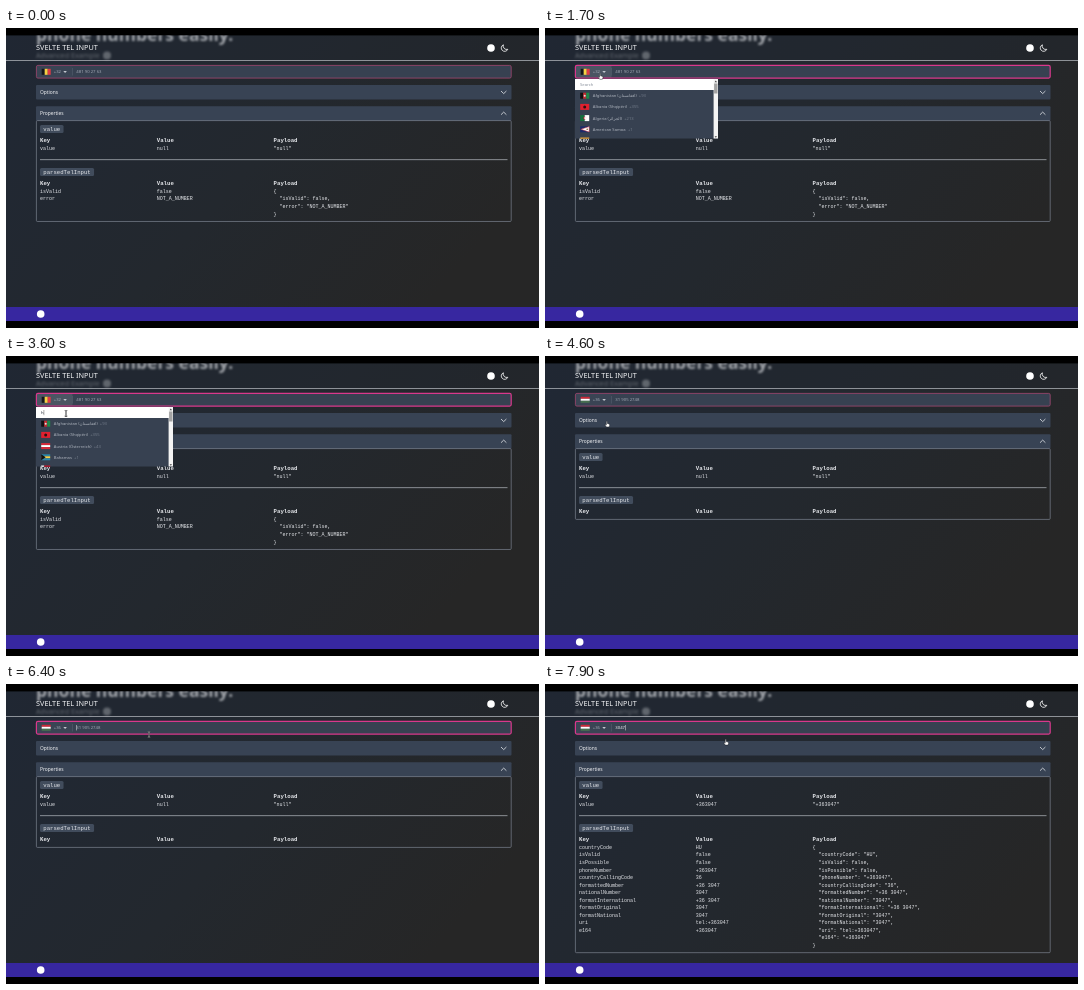
An HTML page that plays this animation: 533x300 px, repeating every 8000 ms.

```html
<!DOCTYPE html>
<html lang="en">
<head>
<meta charset="utf-8">
<style>
html, body { margin: 0; width: 100%; height: 100%; overflow: hidden; background: #000; }
svg { display: block; width: 100vw; height: 100vh; font-family: "Noto Sans", "DejaVu Sans", sans-serif; }
.mono { font-family: "Liberation Mono", monospace; }
</style>
</head>
<body>
<svg viewBox="0 0 533 300">
  <defs>
    <linearGradient id="bg" x1="0" y1="0" x2="1" y2=".5">
      <stop offset="0" stop-color="#202835"/>
      <stop offset=".55" stop-color="#23282e"/>
      <stop offset="1" stop-color="#262626"/>
    </linearGradient>
    <clipPath id="page"><rect y="7.5" width="533" height="285.5"/></clipPath>
    <clipPath id="menu"><rect x="30" y="50" width="145" height="60.7"/></clipPath>
    <filter id="blur" x="-10%" y="-50%" width="120%" height="200%"><feGaussianBlur stdDeviation="1.3"/></filter>
  </defs>
  <g clip-path="url(#page)">
    <rect width="533" height="300" fill="url(#bg)"/>
    <g filter="url(#blur)" fill="#e5e7eb">
      <text x="30" y="12.5" font-size="17.5" font-weight="700">phone numbers easily.</text>
      <g opacity=".5">
        <text x="30" y="30" font-size="7.2">Advanced Example</text>
        <circle cx="101" cy="27.5" r="4"/>
      </g>
    </g>
    <rect y="7" width="533" height="25" fill="#20262f" opacity=".35"/>
    <rect y="32" width="533" height=".8" fill="#a9adb3"/>
    <text x="30" y="22.3" font-size="7.3" fill="#f3f4f6">SVELTE TEL INPUT</text>
    <circle cx="485" cy="20" r="3.8" fill="#fff"/>
    <path d="M497.4 16.8a3.4 3.4 0 1 0 4.4 4.5a3.5 3.5 0 0 1-4.4-4.5z" fill="none" stroke="#fff" stroke-width=".8"/>
    <rect y="279" width="533" height="14" fill="#3727a0"/>
    <circle cx="34.7" cy="286" r="3.8" fill="#fff"/>
    <g id="view"></g>
  </g>
</svg>
<script>
const LOOP = 8000, OPEN = 1500, PICK = 4500, FOCUS = 6300;
const view = document.getElementById("view");

const box = (x, y, w, h, fill, more = "") =>
  `<rect x="${x}" y="${y}" width="${w}" height="${h}" fill="${fill}" ${more}/>`;
const path = (d, stroke, w, fill = "none") =>
  `<path d="${d}" fill="${fill}" stroke="${stroke}" stroke-width="${w}"/>`;
// y is the vertical middle of the line
const text = (x, y, s, size, fill, more = "") =>
  `<text x="${x}" y="${y + size * .35}" font-size="${size}" fill="${fill}" ${more}>${s}</text>`;
const mono = (x, y, s, size = 5, weight = 400) =>
  text(x, y, s, size, "#e5e7eb", `class="mono" font-weight="${weight}"`);

// "v" stripes stand side by side, "h" stripes are stacked
function flag(x, y, [dir, colors, mark = ""]) {
  const list = colors.split(" "), n = list.length;
  const stripes = list.map((c, i) => dir == "v"
    ? box(9 * i / n, 0, 9 / n, 6, c) : box(0, 6 * i / n, 9, 6 / n, c)).join("");
  return `<g transform="translate(${x} ${y - 3})">${stripes}${mark}</g>`;
}

const dot = (x, r, c) => `<circle cx="${x}" cy="3" r="${r}" fill="${c}"/>`;
const rtl = s => `(&#x2068;${s}&#x2069;)`;
const BE = ["v", "#16161a #f5d142 #e03a45"];
const HU = ["h", "#ce2939 #fff #477050"];
const afghanistan = ["Afghanistan " + rtl("افغانستان"), "+93", ["v", "#111 #bf2a2f #1c8a48", dot(4.5, 1, "#ddd")]];
const albania = ["Albania (Shqipëri)", "+355", ["h", "#e0202f", dot(4.5, 1.5, "#2a1012")]];
const hungary = ["Hungary (Magyarország)", "+36", HU];
const lists = {
  "": [afghanistan, albania,
    ["Algeria " + rtl("الجزائر"), "+213", ["v", "#16703c #fff", dot(4.6, 1.4, "#d21034") + dot(5.1, 1.1, "#fff")]],
    ["American Samoa", "+1", ["h", "#1b2a6b", path("M9 .3L.6 3L9 5.7z", "#c22a3c", .5, "#fff") + dot(7, .8, "#8a5a2c")]],
    ["Andorra", "+376", ["h", "#e8a33a"]]],
  h: [afghanistan, albania,
    ["Austria (Österreich)", "+43", ["h", "#d92b3a #fff #d92b3a"]],
    ["Bahamas", "+1", ["h", "#2c86a8 #f5d24b #2c86a8", path("M0 0L4.5 3L0 6z", "none", 0, "#111")]],
    ["Bahrain", "+973", ["v", "#fff #ce1126 #ce1126"]]],
  hu: [["Bhutan", "+975", ["v", "#f3c531 #e8682a"]], hungary,
    ["Lithuania (Lietuva)", "+370", ["h", "#f5c32c #1c7a4c #b92a35"]]],
  hun: [hungary]
};

const latest = (steps, t) => steps.reduce((v, [at, s]) => t >= at ? s : v, "");
const searched = t => latest([[3400, "h"], [3700, "hu"], [3900, "hun"]], t);
const typed = t => latest([[7200, "3"], [7400, "30"], [7700, "304"], [7900, "3047"]], t);

function parsed(t, num) {
  if (t < PICK) return { isValid: false, error: "NOT_A_NUMBER" };
  if (!num) return null;
  if (num.length < 2) return { isValid: false, error: "TOO_SHORT" };
  const full = "+36" + num, spaced = "+36 " + num;
  return {
    countryCode: "HU", isValid: false, isPossible: false, phoneNumber: full,
    countryCallingCode: "36", formattedNumber: spaced, nationalNumber: num,
    formatInternational: spaced, formatOriginal: num, formatNational: num,
    uri: "tel:" + full, e164: full
  };
}

function field(t, num) {
  const open = t >= OPEN && t < PICK, lit = open || t >= FOCUS, hu = t >= PICK;
  const hint = hu ? "31 905 2748" : "481 90 27 63";
  return box(30.4, 37.4, 474.8, 12.7, "#374151", 'rx="1.5"') +
    box(31, 38, 35.5, 11.5, open ? "#4b5563" : "#3a4454") +
    box(66.4, 40, .5, 7.5, "#596373") +
    box(30.4, 37.4, 474.8, 12.7, "none",
      `rx="1.5" stroke="${lit ? "#d9388c" : "#a34872"}" stroke-width="${lit ? 1.2 : .8}"`) +
    flag(35.7, 43.8, hu ? HU : BE) +
    text(47.8, 43.7, hu ? "+36" : "+32", 4.2, "#a5acb8") +
    path("M57.3 42.9h3.6l-1.8 2z", "none", 0, "#c3c8d0") +
    text(70.3, 43.7, num || hint, 4.25, num ? "#f3f4f6" : "#a0a7b3") +
    (t >= FOCUS ? box(70.4 + num.length * 2.43, 41, .5, 5.4, "#e5e7eb") : "");
}

function bar(y, label, up) {
  const s = up ? -1 : 1;
  return box(30, y - 7.2, 475.5, 14.4, "#384354", 'rx="1"') +
    text(34, y, label, 4.85, "#f3f4f6") +
    path(`M495 ${y - 1.2 * s}l2.7 ${2.6 * s}l2.7 ${-2.6 * s}`, "#e5e7eb", .8);
}

function table(y, name, rows, payload) {
  const heads = ["Key", "Value", "Payload"].map((s, i) => mono(34 + 116.8 * i, y + 11.2, s, 5.7, 700));
  return box(34, y - 3.9, name.length * 3.39 + 6.6, 7.9, "#414c5c", 'rx="1.5"') +
    mono(37.3, y, name, 5.65) + heads.join("") +
    rows.map(([k, v], i) => mono(34, y + 19.2 + 7.52 * i, k) + mono(150.8, y + 19.2 + 7.52 * i, v)).join("") +
    payload.map((s, i) => mono(267.6 + (s[0] == " " ? 6 : 0), y + 19.2 + 7.52 * i, s.trim())).join("");
}

function panel(t, num) {
  const data = parsed(t, num), rows = data ? Object.entries(data) : [];
  const lines = data ? JSON.stringify(data, null, 2).split("\n") : [];
  const value = num.length > 1 ? "+36" + num : "null";
  return box(30.4, 92.6, 474.8, 70.8 + 7.52 * lines.length, "none", 'rx="1" stroke="#7b8390" stroke-width=".7"') +
    table(101, "value", [["value", value]], [`"${value}"`]) +
    box(34, 131.4, 467.5, .7, "#b4b8be") +
    table(144, "parsedTelInput", rows, lines);
}

function menu(t) {
  const query = searched(t), items = lists[query], scroll = items.length > 4;
  const width = scroll ? (query ? 137 : 143) : 133, right = 30 + width;
  const height = scroll ? 60 : 12 + 11.2 * items.length;
  let out = box(30, 50.7, width, height, "#374151") +
    box(30, 51, width, 11, "#fff") +
    text(35, 56.6, query || "Search", 4.2, query ? "#1f2937" : "#8b929e");
  if (t > 2600) out += box(35.2 + query.length * 2.55, 54, .4, 5.2, "#333");
  items.forEach(([name, code, art], i) => {
    const y = 67.7 + 11.2 * i;
    if (t >= 4200) out += box(30, y - 5.6, width, 11.2, "#4b5563");
    out += flag(35.2, y, art) +
      text(47.8, y, `${name}<tspan dx="2.2" fill="#737c8a">${code}</tspan>`, 4.15, "#adb3bd");
  });
  if (scroll) out += box(right - 4.4, 51, 4.4, 59.7, "#f4f4f4") +
    box(right - 3.9, 55.5, 3.4, 10, "#a3a3a3") +
    path(`M${right - 3.4} 54.2h2.4l-1.2-1.6z M${right - 3.4} 108.2h2.4l-1.2 1.6z`, "none", 0, "#444");
  return `<g clip-path="url(#menu)">${out}</g>`;
}

// time, x, y, pointer shape from then on
const track = [
  [700, 92, 68, "hand"], [1050, 63, 51, "hand"], [1200, 63, 51, "hand"], [1500, 55.7, 48.5, "hand"],
  [2000, 55.7, 48.5, "hand"], [2300, 59, 55, "beam"], [2600, 60, 57.3, "beam"],
  [4050, 60, 57.3, "beam"], [4200, 62, 68, "hand"], [4500, 62, 68, "hand"],
  [4900, 64.7, 69, "hand"], [5500, 64.7, 69, "hand"], [5900, 110, 58, "beam"],
  [6250, 143, 50.5, "beam"], [6450, 143, 50.5, "beam"], [6800, 181.3, 58.3, "hand"]
];
const shapes = {
  hand: path("M-1.1-2.7q.6-.6 1 0v2l1.6.5q1 .2.8 1.2l-.6 1.8h-2.7l-1.4-2q0-.7.7-.5l.6.5z", "#15171b", .45, "#fff"),
  beam: path("M-1.2-2.8q1.2 0 1.2.7q0-.7 1.2-.7M0-2.1v4.2M-1.2 2.8q1.2 0 1.2-.7q0 .7 1.2.7", "#111", 1.1) +
    path("M-1.2-2.8q1.2 0 1.2.7q0-.7 1.2-.7M0-2.1v4.2M-1.2 2.8q1.2 0 1.2-.7q0 .7 1.2.7", "#e5e7eb", .55)
};

function pointer(t) {
  const i = track.findLastIndex(k => k[0] <= t);
  if (i < 0) return "";
  const a = track[i], b = track[i + 1] || a;
  const p = b == a ? 0 : (t - a[0]) / (b[0] - a[0]), e = p * p * (3 - 2 * p);
  const x = a[1] + (b[1] - a[1]) * e, y = a[2] + (b[2] - a[2]) * e;
  return `<g transform="translate(${x} ${y})">${shapes[a[3]]}</g>`;
}

function draw(now) {
  const t = now % LOOP, num = typed(t);
  view.innerHTML = field(t, num) + bar(64.2, "Options", false) + bar(85.5, "Properties", true) +
    panel(t, num) + (t >= OPEN && t < PICK ? menu(t) : "") + pointer(t);
  requestAnimationFrame(draw);
}
requestAnimationFrame(draw);
</script>
</body>
</html>
```
